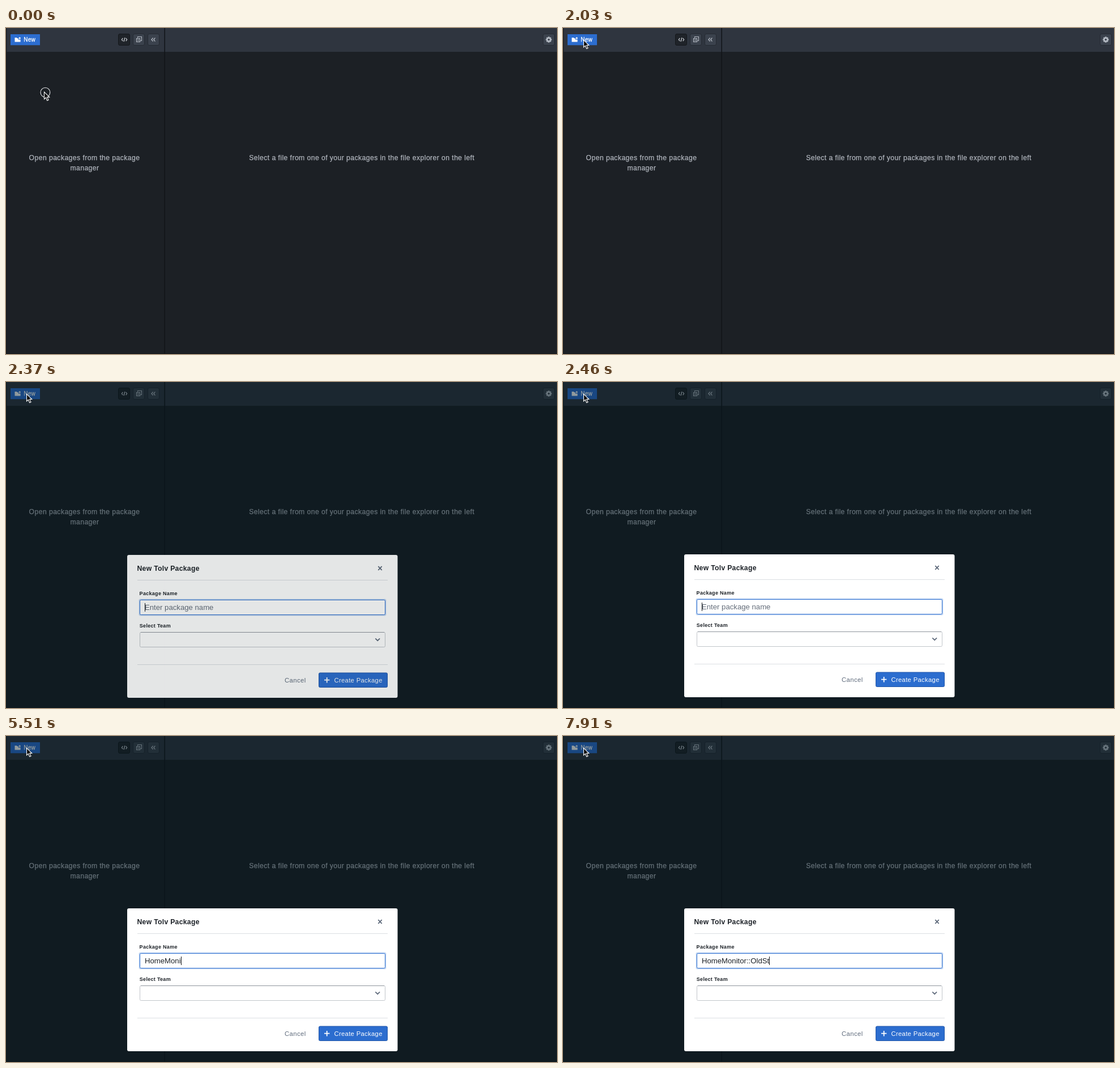
Write an HTML page with a canvas that moves like this. It is 973 px wide and 575 px high and loops after 8000 ms.

```html
<!DOCTYPE html>
<html lang="en">
<head>
<meta charset="utf-8">
<title>New package dialog</title>
<style>
  html, body { margin: 0; width: 100%; height: 100%; overflow: hidden; background: #1c2025; }
  canvas { display: block; }
</style>
</head>
<body>
<canvas id="stage" width="973" height="575"></canvas>
<script>
const W = 973, H = 575, LOOP = 8000, TICK = 87.9;
const FONT = '"Liberation Sans", Arial, sans-serif';
const DARK = '#1c2127', GRAY = '#5f6b7c', BLUE = '#2c6dcf', LINE = '#dcdfe3';
const stage = document.getElementById('stage').getContext('2d');
const layer = Object.assign(document.createElement('canvas'), { width: W, height: H });
const dialogCtx = layer.getContext('2d');

const NAME = 'HomeMonitor::OldSt';
const TYPE_START = 3540, KEY_GAP = 257;
const POINTER = new Path2D('M.5 .3v12.6l2.9 -2.7 2.3 5.3 2.3 -1 -2.3 -5.1h4z');
const FOLDER = new Path2D('M15.5 17h3.3l1.2 1.2h1.8v2.2h3.8v4.2h-10.1z');

const clamp = v => Math.max(0, Math.min(1, v));
const mix = (a, b, u) => a + (b - a) * u;

function text(c, str, x, y, size, color, { spacing = 0.3, weight = 400, bolder = 0 } = {}) {
  c.font = `${weight} ${size}px ${FONT}`;
  c.letterSpacing = spacing + 'px';
  c.fillStyle = color;
  c.fillText(str, x, y);
  if (bolder) stroke(c, color, bolder, () => c.strokeText(str, x, y));
}

function stroke(c, color, width, draw) {
  c.strokeStyle = color;
  c.lineWidth = width;
  draw();
}

function rect(c, x, y, w, h, color) {
  c.fillStyle = color;
  c.fillRect(x, y, w, h);
}

function box(c, x, y, w, h, r, fill, border) {
  c.beginPath();
  c.roundRect(x, y, w, h, r);
  c.fillStyle = fill;
  c.fill();
  if (border) stroke(c, border, 1, () => c.stroke());
}

function disc(c, x, y, r, color) {
  c.beginPath();
  c.arc(x, y, r, 0, 7);
  c.fillStyle = color;
  c.fill();
}

function path(c, d, color, width) {
  stroke(c, color, width, () => c.stroke(new Path2D(d)));
}

// Angle mark with its tip at (x, y), opening towards (dx, dy)
function chevron(c, x, y, dx, dy, color, width) {
  const flipX = dx && Math.abs(dx) < Math.abs(dy) ? dx : -dx;
  const sideways = flipX === dx;
  path(c, `M${x + dx} ${y + dy}L${x} ${y}L${x + (sideways ? dx : -dx)} ${y + (sideways ? -dy : dy)}`,
    color, width);
}

function plus(c, x, y, r, color, width) {
  path(c, `M${x - r} ${y}h${2 * r}M${x} ${y - r}v${2 * r}`, color, width);
}

function drawGear(c, x, y, color, hole) {
  c.save();
  c.translate(x, y);
  for (let i = 0; i < 4; i++, c.rotate(Math.PI / 4)) rect(c, -1.3, -5.2, 2.6, 10.4, color);
  c.restore();
  disc(c, x, y, 3.9, color);
  disc(c, x, y, 1.7, hole);
}

function drawToolbar(c) {
  const ink = '#b5bbc4', face = '#3b424d', edge = '#252a32', mid = 20.5;
  rect(c, 0, 0, W, 42, '#2f353f');
  rect(c, 279.5, 0, 1.5, H, '#111418');
  rect(c, 0, 0, 1.3, H, '#15181c');
  rect(c, 0, H - 1, W, 1, '#13161a');

  rect(c, 8, 11, 52, 19.3, BLUE);
  c.fillStyle = '#fff';
  c.fill(FOLDER);
  plus(c, 24.2, 17.9, 1.8, '#fff', 1.3);
  text(c, 'New', 31.3, 24, 10, '#fff', { spacing: 0.2, bolder: 0.3 });

  box(c, 198.5, 10.5, 20, 20, 2.5, '#1f2329', '#14171b');
  chevron(c, 204.4, mid, 2, 2.6, '#d0d4da', 1.2);
  chevron(c, 213.6, mid, -2, 2.6, '#d0d4da', 1.2);
  path(c, 'M209.9 17l-1.8 7', '#d0d4da', 1.2);

  for (const x of [224.5, 250.5, 948.5]) box(c, x, 10.5, 20, 20, 2.5, face, edge);
  path(c, 'M232.5 17.5v-2h7v7h-2M230.5 18.5h6v6h-6z', ink, 1.1);
  path(c, 'M232 20.5h3m-3 2h3', ink, 0.8);
  for (const x of [257, 260.7]) chevron(c, x, mid, 2.7, 3.2, ink, 1.3);
  drawGear(c, 958.5, mid, ink, face);
}

function drawPage(c) {
  rect(c, 0, 0, W, H, '#1c2025');
  drawToolbar(c);
  const put = (str, x, y) =>
    text(c, str, x, y, 12.2, '#b0b5bd', { spacing: 0.43, bolder: 0.25 });
  put('Open packages from the package', 40.6, 233);
  put('manager', 113.4, 251);
  put('Select a file from one of your packages in the file explorer on the left', 429.2, 233);
}

function drawNameField(c, t) {
  box(c, 234.5, 381.5, 437, 30, 3, 'rgba(45,114,210,0.28)');
  box(c, 236.5, 383.5, 433, 26, 2, '#fff', BLUE);
  const typed = NAME.slice(0, Math.max(0, Math.floor((t - TYPE_START) / KEY_GAP) + 1));
  text(c, typed || 'Enter package name', 245, 401, 13.17, typed ? DARK : '#646d7a', { spacing: 0 });
  const caretX = 245 + (typed ? Math.round(c.measureText(typed).width) : 0);
  const blinkOff = t >= 2730 && t < 3270;
  if (!blinkOff) rect(c, caretX, 389, 1, 15, '#111418');
}

function drawDialog(c, t) {
  c.clearRect(0, 0, W, H);
  box(c, 214, 304, 477.5, 252, 3, '#fff');
  text(c, 'New Tolv Package', 231.5, 332, 12.2, DARK, { weight: 700 });
  path(c, 'M657.3 324.2l6.4 6.6m0 -6.6l-6.4 6.6', GRAY, 1.8);
  for (const y of [348, 497]) rect(c, 232, y, 442, 1, LINE);

  text(c, 'Package Name', 235.6, 375, 9, DARK, { weight: 700 });
  drawNameField(c, t);

  text(c, 'Select Team', 235.8, 432, 9, DARK, { weight: 700 });
  box(c, 236.5, 440.5, 433, 26, 2, '#fff', '#c2c6cb');
  rect(c, 238, 440, 430, 1, '#8f959d');
  path(c, 'M652.3 451.3l3.9 3.9 3.9 -3.9', GRAY, 1.7);

  text(c, 'Cancel', 492, 528.5, 11.3, GRAY, { spacing: 0.42 });
  box(c, 552.5, 512, 121, 25.5, 2, BLUE, '#2257a9');
  plus(c, 566.7, 524.7, 4.7, '#fff', 1.8);
  text(c, 'Create Package', 579.5, 528.5, 11.3, '#fff');
}

// The pointer speeds up towards the button, then settles on it.
function pointerAt(t) {
  const tick = Math.floor((t + 5) / TICK);
  const go = clamp((tick - 6) / 10), rest = (1 - clamp((tick - 16) / 7)) ** 2;
  if (tick <= 16) return [mix(67, 42, go ** 2.6), mix(112.5, 36, go ** 4)];
  return [mix(36, 42, rest), mix(21, 36, rest)];
}

function drawPointer(c, [x, y]) {
  c.save();
  c.translate(x, y);
  c.fillStyle = '#08090b';
  c.fill(POINTER);
  stroke(c, '#fff', 1.1, () => c.stroke(POINTER));
  c.restore();
}

function drawRing(c, x, y) {
  c.beginPath();
  c.arc(x, y, 8.4, 0, 7);
  stroke(c, '#e8eaed', 1.1, () => c.stroke());
}

function render(t) {
  const c = stage;
  drawPage(c);
  if (t >= 2200) rect(c, 0, 0, W, H, `rgba(0,23,29,${t < 2290 ? 0.25 : 0.43})`);
  if (t >= 2290) {
    // The dialog fades in over three steps while rising into place.
    const left = 1 - clamp(Math.floor((t - 2285) / 85) / 2);
    const hidden = left === 1 ? 0.91 : left / 4.5;
    drawDialog(dialogCtx, t);
    c.globalAlpha = 1 - hidden;
    c.drawImage(layer, 0, 6.5 * left ** 2.7);
    c.globalAlpha = 1;
  }
  if (t < 90) drawRing(c, 69.4, 113.6);
  drawPointer(c, pointerAt(t));
}

function loop() {
  render(performance.now() % LOOP);
  requestAnimationFrame(loop);
}
loop();
</script>
</body>
</html>
```
